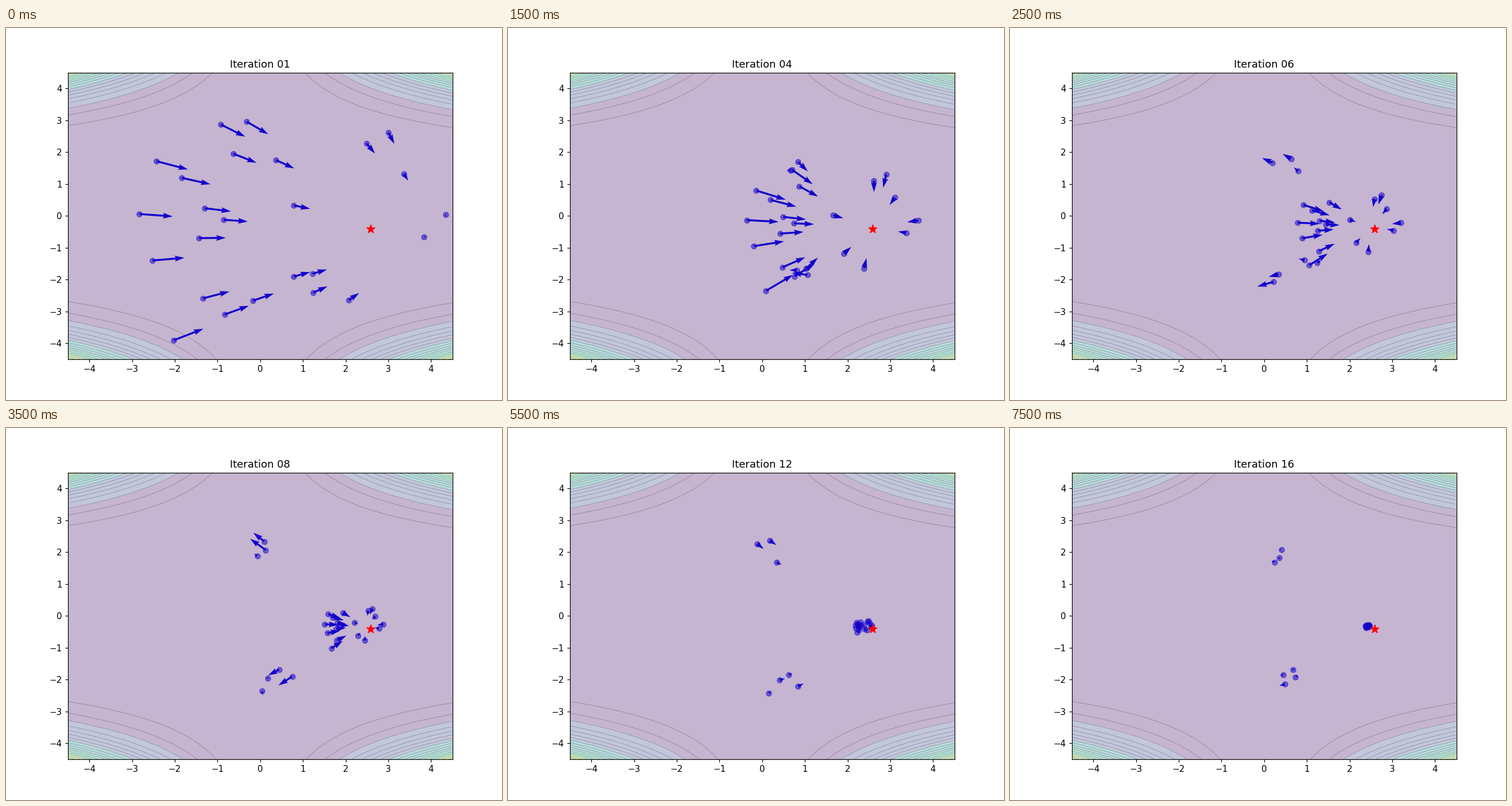
Write a matplotlib script that moves like this. It is 864 by 648 pixels and loops after 8 s.

```python
import numpy as np
import matplotlib.pyplot as plt
from matplotlib.animation import FuncAnimation

W, H, DPI = 864, 648, 108
LIM = 4.5
STEPS = 16
BLUE = (0.08, 0, 0.8)

# Points in stage pixels.
HOME = np.array([624, 345])        # where most of the swarm settles
FIRST_PULL = np.array([762, 362])  # best spot at the first step
MAIN = [
    (262, 232), (306, 261), (396, 219), (232, 324), (346, 314), (379, 334),
    (501, 309), (336, 366), (255, 405), (628, 201), (666, 182), (693, 254),
    (766, 325), (728, 364), (597, 474), (534, 428), (343, 471), (292, 544),
]
STRAYS = [(374, 168), (419, 163), (470, 230),
          (501, 433), (381, 499), (430, 475), (535, 461)]
NESTS = [(452, 214), (462, 203), (460, 232),
         (478, 431), (480, 445), (482, 428), (484, 450)]


def beale(x, y):
    return ((1.5 - x + x * y) ** 2 + (2.25 - x + x * y ** 2) ** 2
            + (2.625 - x + x * y ** 3) ** 2)


def to_data(p):
    """Stage pixels to axes data coordinates."""
    x = (p[..., 0] - 0.125 * W) / (0.775 * W) * 2 * LIM - LIM
    y = LIM - (p[..., 1] - 0.12 * H) / (0.77 * H) * 2 * LIM
    return np.stack([x, y], axis=-1)


def swarm():
    """Damped pull to HOME; strays switch to a springy pull to their nest."""
    x = np.array(MAIN + STRAYS, float)
    nest = np.array([HOME] * len(MAIN) + NESTS)
    stray = np.arange(len(x)) >= len(MAIN)
    join = np.hypot(*(x - nest).T) / 20
    v = 0.11 * (FIRST_PULL - x)
    path = [x - v, x]
    for t in range(2, STEPS + 1):
        nested = (stray & (t > join))[:, None]
        v = np.where(nested, 0.8 * v + 0.33 * (nest - x),
                     0.5 * v + 0.092 * (HOME - x))
        x = x + v
        path.append(x)
    return to_data(np.array(path))


pos = swarm()
vel = np.diff(pos, axis=0)

fig, ax = plt.subplots(figsize=(W / DPI, H / DPI), dpi=DPI)
fig.subplots_adjust(left=0.125, right=0.9, bottom=0.11, top=0.88)

grid = np.linspace(-LIM, LIM, 250)
X, Y = np.meshgrid(grid, grid)
Z = beale(X, Y) / 1e4
ax.contourf(X, Y, Z, levels=[0, 3, 8, 12, 15, 19],
            colors=["#c6b5d0", "#c3c7dc", "#b9dbdc", "#b9e6d6", "#d6f0c0"])
ax.contour(X, Y, Z, levels=range(1, 19), colors="black", linewidths=0.5, alpha=0.3)

dots = ax.scatter(*pos[1].T, color=BLUE, alpha=0.5, zorder=2)
arrows = ax.quiver(*pos[1].T, *vel[0].T, color=BLUE, width=0.005, angles="xy",
                   scale_units="xy", scale=1, zorder=3)
ax.scatter(2.59, -0.41, s=100, marker="*", color="red", zorder=4)
title = ax.set_title("Iteration 01")
ax.set_xlim(-LIM, LIM)
ax.set_ylim(-LIM, LIM)
ax.set_xticks(range(-4, 5))
ax.set_yticks(range(-4, 5))


def update(n):
    title.set_text(f"Iteration {n + 1:02d}")
    dots.set_offsets(pos[n + 1])
    arrows.set_offsets(pos[n + 1])
    arrows.set_UVC(*vel[n].T)
    return dots, arrows, title


anim = FuncAnimation(fig, update, frames=STEPS, interval=500, repeat=True,
                     repeat_delay=0, blit=False)
plt.show()
```
